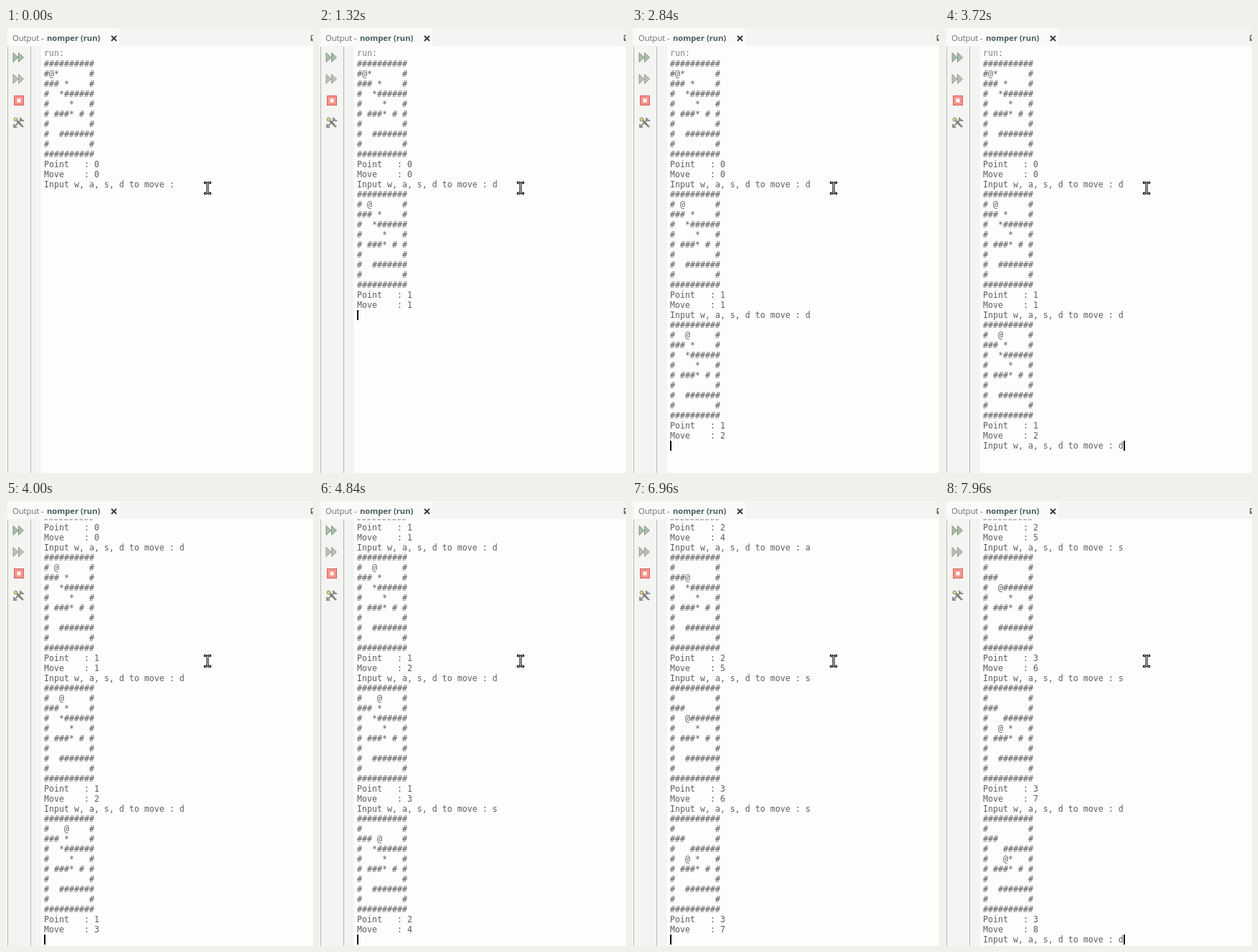
These frames come from a looping animation (428 px wide and 620 px high, 8 s). An HTML page:

```html
<!DOCTYPE html>
<html lang="en">
<head>
<meta charset="utf-8">
<title>Output</title>
<style>
  html, body { margin: 0; width: 100%; height: 100%; overflow: hidden; }
  body { position: relative; background: #f4f5f2; }
  .view { position: absolute; left: 49px; top: 25px; right: 0; bottom: 0; overflow: hidden; background: #fdfdfc; }
  .log { position: absolute; left: 4px; top: 4px; }
  pre {
    margin: 0; color: #5e5e60;
    font: 11.627px/14px "DejaVu Sans Mono", monospace;
  }
  .run { color: #868684; position: relative; top: -1px; }
  .caret { position: absolute; width: 2px; height: 14px; background: #000; }
  svg { position: absolute; left: 0; top: 0; }
  .title { font: 11.2px "Open Sans", sans-serif; fill: #63696a; }
  .title .name { font-weight: 700; fill: #455c60; }
</style>
</head>
<body>
<div class="view">
  <div class="log" id="log">
    <pre class="run">run:</pre>
    <pre id="text"></pre>
    <div class="caret" id="caret"></div>
  </div>
</div>
<svg width="428" height="620" viewBox="0 0 428 620">
  <defs>
    <path id="forward" stroke-linejoin="round"
          d="M10 -6.5 17 0 10 6.5ZM17.5 -6.5 24.5 0 17.5 6.5Z"/>
    <path id="beam" fill="none"
          d="M277.5 215.5H279L281 217.5 283 215.5H284.5M281 217V229M277.5 230.5H279L281 228.5 283 230.5H284.5"/>
  </defs>
  <path d="M3 0H158V25H3Z" fill="#fafbf9"/>
  <path d="M2.5 26V620M34.5 26V620" stroke="#b4b6b1"/>
  <text class="title" x="9" y="18" xml:space="preserve">Output - </text>
  <text class="title" x="57" y="18"><tspan class="name">nomper (run)</tspan></text>
  <path d="M147 11 154 18M154 11 147 18" stroke="#333638" stroke-width="1.8"/>
  <path d="M430 10.5H425.5V17.5H430M426 15.5H430" fill="none" stroke="#3c3e40"/>

  <use href="#forward" y="41" fill="#a9bfa6" stroke="#84968a"/>
  <use href="#forward" y="71" fill="#bcc0b4" stroke="#999c92"/>
  <rect x="11.5" y="94.5" width="13" height="13" fill="#f5938c" stroke="#d9605c"/>
  <rect x="15.5" y="98.5" width="5" height="5" fill="#fff" stroke="#f9c4be"/>
  <g fill="none" stroke-linecap="round">
    <path d="M13 136 22 127M20 125.5V129H24.5M11 134.5V138H14.5" stroke="#8d8e8a" stroke-width="2"/>
    <path d="M16 130 23 137" stroke="#777874" stroke-width="2.6"/>
    <path d="M22 134 25 137" stroke="#cfd0cb" stroke-width="1.5"/>
    <circle cx="13.5" cy="127.5" r="2.5" fill="#e3cf86" stroke="#8f8a70"/>
  </g>
  <use href="#beam" stroke="#111" stroke-width="3.2" stroke-linecap="square"/>
  <use href="#beam" stroke="#fff"/>
</svg>
<script>
const LOOP = 8000, BLINK = 500, LINE = 14, CHAR = 7, LAST_LINE_Y = 575;
const PROMPT = "Input w, a, s, d to move : ";
const STEP = { w: [0, -1], a: [-1, 0], s: [0, 1], d: [1, 0] };

// key, time typed, time entered, time of the next prompt
const turns = [
  ["d", 400, 1320, 1560],
  ["d", 2200, 2640, 2880],
  ["d", 3600, 3800, 4040],
  ["s", 4440, 4680, 4920],
  ["a", 5280, 5480, 5720],
  ["s", 6040, 6200, 6440],
  ["s", 6640, 6840, 7080],
  ["d", 7320, 7480, 7720],
  ["d", 7920]
];

const maze = [
  "##########",
  "# *      #",
  "### *    #",
  "#  *######",
  "#    *   #",
  "# ###* # #",
  "#        #",
  "#  #######",
  "#        #",
  "##########"
].map(row => [...row]);

let x = 1, y = 1, points = 0, moves = 0, output = "";
const states = [];

function print(time, text) {
  output += text;
  const lines = output.split("\n");
  states.push({ time, text: output, row: lines.length, col: lines.at(-1).length });
}

function board() {
  const rows = maze.map((row, j) => row.map((c, i) => i === x && j === y ? "@" : c).join(""));
  return `${rows.join("\n")}\nPoint   : ${points}\nMove    : ${moves}\n`;
}

function move(key) {
  const [dx, dy] = STEP[key];
  x += dx;
  y += dy;
  moves++;
  if (maze[y][x] === "*") points++;
  maze[y][x] = " ";
}

// The caret is hidden for the first 40 ms of the loop.
print(40 - 2 * BLINK, board() + PROMPT);
for (const [key, typed, entered, prompted] of turns) {
  print(typed, key);
  if (!entered) break;
  move(key);
  print(entered, "\n" + board());
  print(prompted, PROMPT);
}

const [log, text, caret] = ["log", "text", "caret"].map(id => document.getElementById(id));
const start = performance.now();
let shown;

function draw() {
  const t = (performance.now() - start) % LOOP;
  const state = states.findLast(s => s.time <= t);
  if (state !== shown) {
    shown = state;
    text.textContent = state.text;
    const scroll = Math.max(0, state.row * LINE - LAST_LINE_Y);
    log.style.transform = `translateY(${-scroll}px)`;
    caret.style.left = state.col * CHAR + "px";
    caret.style.top = state.row * LINE + "px";
  }
  const lit = Math.floor((t - state.time) / BLINK) % 2 === 0;
  caret.style.visibility = lit ? "visible" : "hidden";
  requestAnimationFrame(draw);
}
draw();
</script>
</body>
</html>
```
